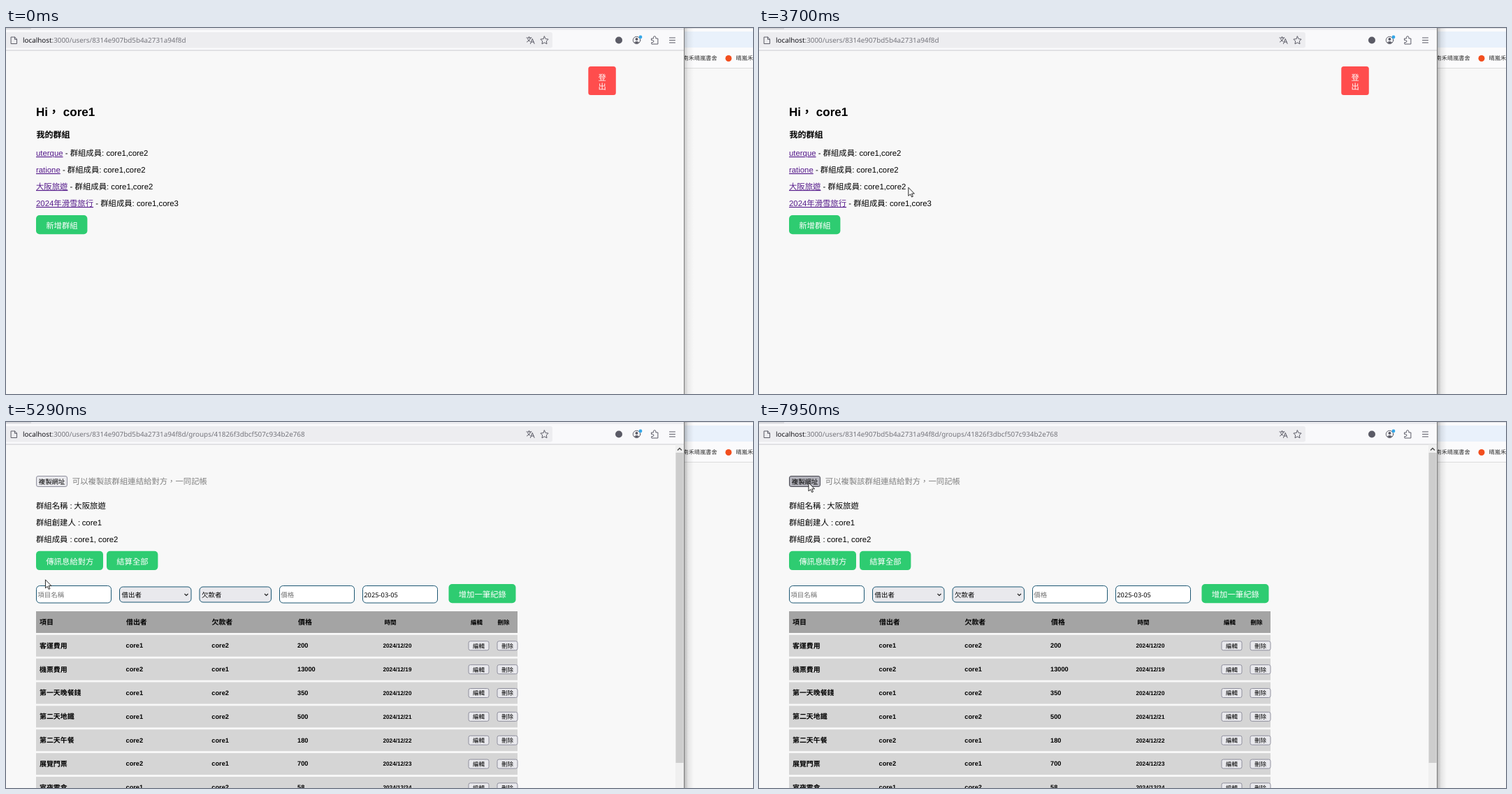
An HTML page for the animation above (8 s loop, 1069x524 px).

```html
<!DOCTYPE html>
<html lang="zh-TW">
<head>
<meta charset="utf-8">
<style>
html, body { margin: 0; width: 100%; height: 100%; overflow: hidden; background: #f8f8f8; }
svg { display: block; }
text { font: 300 11.36px "Liberation Sans", "Noto Sans CJK TC", "Noto Sans CJK", sans-serif; text-rendering: geometricPrecision; }
.h1 { font-size: 17.04px; font-weight: bold; }
.h3 { font-size: 12px; font-weight: bold; }
.ui { font: 9.85px "Noto Sans", "Noto Sans CJK TC", sans-serif; fill: #75757c; }
.mark { font-size: 8.2px; fill: #333; }
.link { fill: #551a8b; text-decoration: underline; }
.field { font-size: 9.46px; font-weight: 400; }
.date { font: 9.3px "Noto Sans", sans-serif; }
.name { font-size: 9.94px; font-weight: bold; }
.cell { font-size: 9.23px; font-weight: bold; }
.day { font-size: 8.2px; font-weight: bold; }
.small { font-size: 8.52px; font-weight: 400; }
.bold { font-weight: bold; }
.icon { fill: none; stroke: #5b5b66; stroke-width: 1; stroke-linejoin: round; stroke-linecap: round; }
</style>
</head>
<body>
<svg id="stage" width="1069" height="524" viewBox="0 0 1069 524"></svg>
<script>
const LOOP = 8000;
const GREEN = '#2ecc71';

const rect = (x, y, w, h, fill, extra = '') =>
  `<rect x="${x}" y="${y}" width="${w}" height="${h}" fill="${fill}" ${extra}/>`;
const text = (x, y, str, cls = '', fill = '') =>
  `<text x="${x}" y="${y}" class="${cls}" ${fill && `style="fill:${fill}"`}>${str}</text>`;
const group = (id, body) => `<g id="${id}">${body}</g>`;
const button = (x, y, w, str) =>
  rect(x, y, w, 27.3, GREEN, 'rx="5"') + text(x + 14.2, y + 19, str, '', '#fff');
const grayButton = (x, y, w, h, extra = '') =>
  rect(x + .5, y + .5, w - 1, h - 1, '#e9e9ed', `rx="2.5" stroke="#8f8f9d" ${extra}`);

function backWindow() {
  return rect(970, 0, 99, 58, '#fbfbfc') + rect(970, 0, 99, 1, '#dedee2') +
    rect(970, 5, 99, 23, '#e9f1fb') + rect(970, 57, 99, 1, '#dcdcdc') +
    text(968.6, 46.3, '南禾晴嵐書舍', 'mark') +
    '<circle cx="1034" cy="43.5" r="4.5" fill="#f24e1e"/>' +
    text(1044.5, 46.3, '晴嵐禾', 'mark') +
    rect(971, 0, 13, 524, 'url(#shade)', 'id="shadow"') +
    rect(0, 0, 970, 524, '#f8f8f8');
}

function toolbar() {
  return rect(0, 0, 970, 32, '#f9f9fb') + rect(0, 0, 970, 3, '#ececf0') +
    rect(0, 0, 36, 2, '#d8d8dc') + rect(-5, 6, 787, 22.5, '#ededf0', 'rx="3"') +
    rect(0, 31.5, 970, 1, '#cccccf') +
    '<path class="icon" d="M7.5 13h5l3 3v6.5h-8zM12.5 13v3.3h3"/>' +
    '<text x="24" y="21" class="ui"><tspan fill="#15141a">localhost</tspan>:3000/users/8314e907bd5b4a2731a94f8d<tspan id="path"></tspan></text>' +
    '<path class="icon" d="M745 14h7M748.5 12.5V14M751 14q-1 4-5.5 6M746.5 15.5q1.5 3 3.5 4M750.5 22.5l2.8-7 2.8 7M751.5 20h3.6"/>' +
    '<path class="icon" d="M770.5 12l1.7 3.6 3.9.5-2.8 2.8.7 3.9-3.5-1.9-3.5 1.9.7-3.9-2.8-2.8 3.9-.5z"/>' +
    '<circle cx="877" cy="17.5" r="5" fill="#5b5b66"/>' +
    '<circle class="icon" cx="902.5" cy="17.5" r="5.2"/><path d="M899 20.5q3.5-3 7 0-3.5 3.5-7 0" fill="#5b5b66"/>' +
    '<circle cx="902.5" cy="16" r="2" fill="#5b5b66"/><circle cx="908" cy="13" r="2.4" fill="#35a7e8"/>' +
    '<path class="icon" d="M924 15h2.5v-1.5a1.7 1.7 0 0 1 3.4 0V15h3v8h-9v-2.5h1.5a1.5 1.5 0 0 0 0-3H924z"/>' +
    '<path class="icon" d="M949.5 14h8M949.5 17.5h8M949.5 21h8"/>';
}

function homePage() {
  const title = 'Hi， core1';
  const rows = [['uterque', 2], ['ratione', 2], ['大阪旅遊', 2], ['2024年滑雪旅行', 3]];
  return rect(833.3, 55, 39.5, 41, '#ff4d4d', 'rx="3.5"') +
    text(847.5, 74.6, '登', '', '#fff') + text(847.5, 87.6, '出', '', '#fff') +
    text(43, 125.6, title, 'h1') +
    `<g clip-path="url(#selected)">${rect(43, 110, 90, 19, '#0078d7')}${text(43, 125.6, title, 'h1', '#fff')}</g>` +
    text(43.5, 156.5, '我的群組', 'h3') +
    rows.map(([name, n], i) => text(43, 183 + i * 24,
      `<tspan class="link" id="link${i}">${name}</tspan> - 群組成員: core1,core${n}`)).join('') +
    button(43, 268, 73.4, '新增群組') +
    group('status', rect(0, 522, 174.5, 2, '#f0f0f3') + rect(0, 522, 174.5, .7, '#ccc'));
}

function groupForm() {
  const input = (x, w, str, cls, fill) =>
    rect(x + .5, 234.5, w - 1, 24.5, '#fff', 'rx="5" stroke="#1b5672"') + text(x + 2.3, 250.7, str, cls, fill);
  const select = (x, str) =>
    rect(x + .5, 236, 102.5, 22, '#e9e9ed', 'rx="5" stroke="#1b5672"') + text(x + 3.5, 250.7, str, 'field') +
    `<path d="M${x + 93.5} 246l2.5 2.5 2.5-2.5" fill="none" stroke="#222" stroke-width="1.2"/>`;
  const heads = [[48, '項目', 'name'], [172, '借出者', 'name'], [294.5, '欠款者', 'name'], [418, '價格', 'name'],
    [541.5, '時間', 'small bold'], [665, '編輯', 'small bold'], [703.5, '刪除', 'small bold']];
  return grayButton(43, 77, 45, 16, 'id="copy"') + text(46.7, 88.7, '複製網址', 'field') +
    text(94.8, 89.2, '可以複製該群組連結給對方，一同記帳', '', '#808080') +
    ['名稱', '創建人', '成員'].map((s, i) => text(43, 124.4 + i * 23.8, `群組${s} :`)).join('') +
    button(43, 184.8, 96, '傳訊息給對方') + button(144, 184.8, 73.4, '結算全部') +
    input(43, 108, '項目名稱', 'field', '#757575') + select(162, '借出者') + select(276.5, '欠款者') +
    input(391, 108, '價格', 'field', '#757575') + input(510, 108, '2025-03-05', 'date') +
    button(633.5, 232, 96, '增加一筆紀錄') +
    rect(43, 271, 689, 31, '#a4a4a4') + heads.map(([x, s, cls]) => text(x, 289.8, s, cls)).join('');
}

function groupData() {
  const records = [['客運費用', 1, 200, 20], ['機票費用', 2, 13000, 19], ['第一天晚餐錢', 1, 350, 20],
    ['第二天地鐵', 1, 500, 21], ['第二天午餐', 2, 180, 22], ['展覽門票', 2, 700, 23], ['宵夜零食', 1, 58, 24]];
  const row = ([name, from, price, day], i) => {
    const y = 304.8 + i * 33.85, base = y + 18.4;
    return rect(43, y, 689, 31, '#d5d5d5') + text(48, base + .5, name, 'name') +
      text(171.5, base, 'core' + from, 'cell') + text(294.3, base, 'core' + (3 - from), 'cell') +
      text(417, base, price, 'cell') + text(539.5, base, '2024/12/' + day, 'day') +
      grayButton(661.5, y + 8.5, 30, 14) + text(668, base + .5, '編輯', 'small') +
      grayButton(702.5, y + 8.5, 30, 14) + text(709, base + .5, '刪除', 'small');
  };
  return text(97.3, 124.4, '大阪旅遊') + text(108.7, 148.2, 'core1') + text(97.3, 172, 'core1, core2') +
    records.map(row).join('') +
    rect(958, 32.5, 12, 492, '#f0f0f0') + rect(958.5, 44, 11, 444, '#cdcdcd') +
    '<path d="M961 40.5l3-3 3 3" fill="none" stroke="#505050" stroke-width="1.5"/>';
}

const pointers = {
  arrow: '<path d="M0 0V12L2.8 9.5 4.7 13.6 6.5 12.8 4.7 8.8H8.5Z" fill="#fff" stroke="#111" stroke-width=".9"/>',
  beam: '<path d="M-2-6H2M0-6V6M-2 6H2" fill="none" stroke="#111"/>',
  hand: '<path d="M-.3 1q1.3-1.8 2.6 0V5.5l5 1.3q1 .4.8 2L7.3 12.5V15H1V13.2L-3 8.8q-.5-1.8 1.3-1.3L-.3 8.8Z" fill="#fff" stroke="#111" stroke-width=".9"/>'
};

const stage = document.getElementById('stage');
stage.innerHTML = `<defs>
  <linearGradient id="shade"><stop stop-opacity=".26"/><stop offset=".4" stop-opacity=".08"/><stop offset="1" stop-opacity="0"/></linearGradient>
  <clipPath id="selected"><rect id="selection" x="43" y="110" width="0" height="19"/></clipPath></defs>` +
  backWindow() + toolbar() + group('home', homePage()) + group('form', groupForm()) + group('data', groupData()) +
  rect(970, 0, 1, 524, '#7c7c7c') +
  '<circle id="press" r="9" fill="#fff25e" style="mix-blend-mode:multiply"/>' +
  group('pointer', Object.entries(pointers).map(([id, body]) => group(id, body)).join(''));

const $ = id => document.getElementById(id);
const show = (id, on) => { $(id).style.display = on ? '' : 'none'; };
const within = (t, a, b) => t >= a && t < b;

// Pointer stops: time, x, y and the shape used from there on.
const route = [
  [530, 733, 504, 'arrow'], [1300, 57, 132, 'arrow'], [1370, 57, 132, 'arrow'], [1510, 44, 120, 'beam'],
  [1650, 44, 120, 'beam'], [1790, 103, 120, 'beam'], [1860, 112, 120, 'beam'], [2130, 140, 122, 'arrow'],
  [2340, 152, 124, 'arrow'], [2410, 152, 124, 'arrow'], [2760, 112, 239, 'arrow'], [2970, 106, 226, 'beam'],
  [3030, 106, 226, 'beam'], [3330, 211, 227, 'arrow'], [3420, 234, 227, 'arrow'], [3560, 234, 227, 'arrow'],
  [3770, 204, 229, 'beam'], [3840, 190, 229, 'beam'], [3990, 88, 228, 'hand'], [4050, 57, 227, 'hand'],
  [4940, 56.5, 226, 'arrow'], [5290, 56.5, 226, 'arrow'], [5650, 35, 160, 'arrow'], [6030, 66, 86, 'arrow'],
  [6100, 72, 86, 'arrow'], [6180, 89, 85, 'beam'], [6230, 93, 85.5, 'beam'], [6300, 100, 86, 'beam'],
  [6600, 287, 90, 'arrow'], [6720, 334, 93, 'arrow'], [6920, 334, 95, 'arrow'], [7080, 287, 100, 'arrow'],
  [7400, 100, 92, 'arrow'], [7550, 71, 87, 'arrow'], [LOOP, 71, 87, 'arrow']
];

function pointerAt(t) {
  const i = Math.max(1, route.findIndex(p => p[0] > t));
  const [t0, x0, y0, shape] = route[i - 1], [t1, x1, y1] = route[i];
  const u = Math.max(0, (t - t0) / (t1 - t0));
  return { x: x0 + (x1 - x0) * u, y: y0 + (y1 - y0) * u, shape };
}

const letterEdges = [43, 55.3, 60, 77, 81.8, 91.2, 101.7, 108.3, 117.8, 127.3];

// The selection trails the pointer and snaps to whole letters.
function selectionWidth(t) {
  if (!within(t, 1650, 2340)) return 0;
  const x = pointerAt(t - 60).x;
  return letterEdges.filter(edge => edge <= x).pop() - 43;
}

function draw(t) {
  const { x, y, shape } = pointerAt(t);
  const clicked = within(t, 4730, 4870);
  show('home', t < 4870);
  show('form', t >= 4940);
  show('data', t >= 5290);
  show('status', clicked);
  $('path').textContent = t < 4870 ? '' : '/groups/41826f3dbcf507c934b2e768';
  $('link2').style.fill = clicked ? '#ee0000' : '';
  $('shadow').setAttribute('opacity', t < 1580 ? .7 : 1);
  $('selection').setAttribute('width', selectionWidth(t));

  const over = t > 5290 && within(x, 43, 88) && within(y, 77, 93);
  $('copy').setAttribute('fill', t >= 7950 ? '#b1b1b9' : t >= 7880 ? '#bcbcc4' : over ? '#d0d0d7' : '#e9e9ed');
  $('copy').setAttribute('stroke', t >= 7880 ? '#484851' : over ? '#676774' : '#8f8f9d');

  show('press', within(t, 1580, 2130) || within(t, 2340, 2410) || within(t, 4730, 4800));
  show('pointer', t >= 530);
  for (const id in pointers) show(id, id === shape);
  for (const id of ['press', 'pointer']) $(id).setAttribute('transform', `translate(${x} ${y})`);
}

const start = performance.now();
function tick() {
  draw((performance.now() - start) % LOOP);
  requestAnimationFrame(tick);
}
tick();
</script>
</body>
</html>
```
